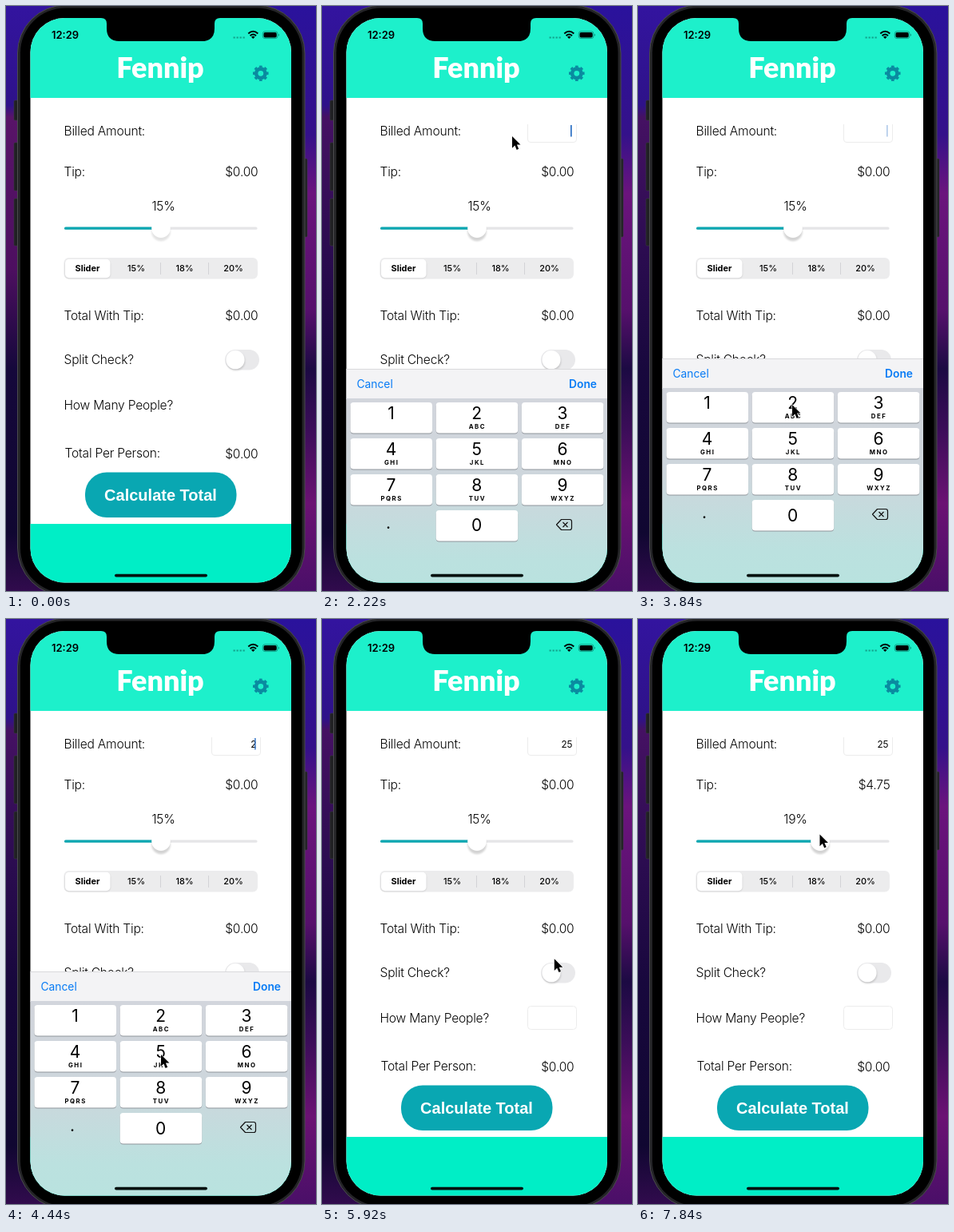
These frames come from a looping animation (388 by 732 pixels, 7.99 s). An HTML page:

```html
<!DOCTYPE html>
<html lang="en">
<head>
<meta charset="utf-8">
<title>Tip calculator</title>
<style>
html, body { margin: 0; width: 100%; height: 100%; overflow: hidden; background: #12092f; }
svg { display: block; width: 388px; height: 732px; font-family: Inter, "Open Sans", sans-serif; }
.label { font-size: 15.6px; font-weight: 300; letter-spacing: -.22px; fill: #050505; }
.end { text-anchor: end; }
.mid { text-anchor: middle; }
.segment { font-size: 10.9px; font-weight: 500; text-anchor: middle; }
.digit { font-size: 21px; text-anchor: middle; }
.letters { font-size: 7.8px; font-weight: 700; letter-spacing: 1.5px; text-anchor: middle; }
.bar { font-size: 13.8px; fill: #077bf5; }
</style>
</head>
<body>
<svg viewBox="0 0 388 732">
  <defs>
    <linearGradient id="left" x2="0" y2="1">
      <stop offset="0" stop-color="#33149f"/><stop offset=".17" stop-color="#2e1289"/>
      <stop offset=".19" stop-color="#581468"/><stop offset=".45" stop-color="#4d0f60"/>
      <stop offset=".62" stop-color="#15083b"/><stop offset=".9" stop-color="#100731"/>
      <stop offset="1" stop-color="#310b4d"/>
    </linearGradient>
    <linearGradient id="leftLater" x2="0" y2="1">
      <stop offset="0" stop-color="#33149f"/><stop offset=".17" stop-color="#2e1289"/>
      <stop offset=".19" stop-color="#451163"/><stop offset=".42" stop-color="#2b0c50"/>
      <stop offset=".62" stop-color="#18083d"/><stop offset=".9" stop-color="#100731"/>
      <stop offset="1" stop-color="#310b4d"/>
    </linearGradient>
    <linearGradient id="right" x2="0" y2="1">
      <stop offset="0" stop-color="#2a129c"/><stop offset=".22" stop-color="#34118a"/>
      <stop offset=".32" stop-color="#6b147d"/><stop offset=".52" stop-color="#56106c"/>
      <stop offset=".62" stop-color="#1c0a43"/><stop offset=".72" stop-color="#3a0d58"/>
      <stop offset=".85" stop-color="#6b1273"/><stop offset="1" stop-color="#4a0f68"/>
    </linearGradient>
    <linearGradient id="board" x2="0" y2="1">
      <stop offset="0" stop-color="#d2d5dc"/><stop offset=".42" stop-color="#cdd6dc"/>
      <stop offset=".78" stop-color="#bbe1df"/><stop offset="1" stop-color="#b8e3df"/>
    </linearGradient>
    <clipPath id="screen"><rect x="30.500" y="15" width="326.500" height="706.500" rx="43"/></clipPath>
    <filter id="soft" x="-50%" y="-50%" width="200%" height="200%"><feGaussianBlur stdDeviation="1.3"/></filter>
  </defs>

  <rect id="wall" width="194" height="732"/>
  <rect x="194" width="194" height="732" fill="url(#right)"/>
  <g fill="#202023" stroke="#3c3b40" stroke-width=".6">
    <rect x="10" y="118" width="6" height="25" rx="1.500"/>
    <rect x="10" y="171" width="6" height="60" rx="1.500"/>
    <rect x="10" y="241" width="6" height="59" rx="1.500"/>
    <rect x="372" y="191" width="5" height="98" rx="1.500"/>
  </g>
  <rect x="14.500" y="-1" width="359.500" height="739" rx="60" fill="#242427" stroke="#4b4b4e"/>
  <rect x="18" y="2.500" width="352.500" height="732" rx="56"/>

  <g clip-path="url(#screen)">
    <path d="M30 15H358V722H30Z" fill="#fff"/>
    <path d="M30 15H358V115H30Z" fill="#1df0cb"/>
    <path d="M30 648H358V722H30Z" fill="#00eec6"/>
    <text x="193" y="90" class="mid" style="font:900 36px Lato,sans-serif" fill="#fff">Fennip</text>
    <g transform="translate(318.800 84.300)" fill="none" stroke="#0a8ba0">
      <circle r="5.700" stroke-width="4.600"/>
      <circle r="8.400" stroke-width="2.800" pathLength="16" stroke-dasharray="1.100 .9" stroke-dashoffset=".55"/>
    </g>

    <g class="label">
      <text x="72.500" y="162">Billed Amount:</text>
      <text x="72.500" y="213">Tip:</text>
      <text x="72.500" y="393">Total With Tip:</text>
      <text x="72.500" y="448">Split Check?</text>
      <text x="72.500" y="505">How Many People?</text>
      <text x="73.500" y="564.500">Total Per Person:</text>
      <text id="percent" class="mid" x="197" y="255.500"></text>
      <text id="tip" class="end" x="315.500" y="212.500"></text>
      <text class="end" x="315.500" y="392.500">$0.00</text>
      <text class="end" x="315.500" y="566">$0.00</text>
    </g>

    <g id="fields" fill="none" stroke="#ececec">
      <path d="M257.500 148V167Q257.500 170.500 261 170.500H315Q318.500 170.500 318.500 167V148"/>
      <rect x="257.500" y="484.500" width="61" height="29" rx="4"/>
    </g>
    <text id="amount" class="end" x="313.500" y="160.500" font-size="11.700"></text>
    <rect id="caret" x="311" y="149" width="1.700" height="14.500" fill="#2c6fc4"/>

    <rect x="73" y="276.500" width="241.500" height="3.300" rx="1.600" fill="#e5e5e7"/>
    <rect id="filled" x="73" y="276.500" height="3.300" rx="1.600" fill="#0aa7b1"/>
    <g id="thumb">
      <circle id="thumbShadow" cy="282.500" r="11.800" filter="url(#soft)"/>
      <circle cy="278.200" r="11.800" fill="#fff"/>
    </g>

    <rect x="72.500" y="315" width="242.500" height="26.500" rx="6" fill="#ececed"/>
    <rect x="74" y="318" width="56.500" height="23" rx="5" fill="#000" opacity=".14" filter="url(#soft)"/>
    <rect x="74" y="316.800" width="56.500" height="23.400" rx="5" fill="#fff"/>
    <path d="M193.500 321V336M253.500 321V336" stroke="#d3d3d6"/>
    <g class="segment">
      <text x="102" y="332.400" font-weight="650">Slider</text>
      <text x="163" y="332.400">15%</text>
      <text x="223.500" y="332.400">18%</text>
      <text x="284.500" y="332.400">20%</text>
    </g>

    <rect x="274" y="430" width="43" height="25.500" rx="12.700" fill="#e9e9eb"/>
    <circle cx="287.500" cy="444.500" r="11.600" opacity=".16" filter="url(#soft)"/>
    <circle cx="287" cy="442.700" r="11.600" fill="#fff"/>

    <rect x="99" y="583.500" width="189.500" height="56.500" rx="27" fill="#09a7b2"/>
    <text x="193.500" y="618.500" class="mid" style="font:700 20px 'Liberation Sans',sans-serif" fill="#fff">Calculate Total</text>

    <g id="keyboard">
      <rect x="30" y="441" width="328" height="38" fill="#f3f3f5"/>
      <path d="M30 441.500H358" stroke="#d9d9dc"/>
      <rect x="30" y="478" width="328" height="260" fill="url(#board)"/>
      <text class="bar" x="43.500" y="465">Cancel</text>
      <text class="bar end" x="344" y="465" font-weight="600">Done</text>
      <g id="keys"></g>
      <text x="83" y="641" class="digit" font-size="20">.</text>
      <path d="M293.500 636L299.500 629.500H310Q312.500 629.500 312.500 632V640Q312.500 642.500 310 642.500H299.500ZM301.500 633L307.500 639M307.500 633L301.500 639"
        fill="none" stroke="#111" stroke-width="1.200" stroke-linejoin="round"/>
    </g>
  </g>

  <path d="M119 14V15Q126 15 126 22V28Q126 44 142 44H245Q261 44 261 28V22Q261 15 268 15V14Z"/>
  <text x="57" y="41" font-size="13" font-weight="600">12:29</text>
  <path d="M284.500 39.500H299" stroke="#12a48d" stroke-width="2" stroke-dasharray="2.300 1.700"/>
  <g fill="none" stroke="#000" stroke-width="2">
    <path d="M303.300 34.500Q309.300 29 315.300 34.500M305.600 37.200Q309.300 33.800 313 37.200"/>
  </g>
  <path d="M307 38.700Q309.300 36.800 311.600 38.700L309.300 41Z"/>
  <rect x="321.300" y="31.800" width="18.600" height="8.800" rx="2.700" fill="none" stroke="#0c8c78" stroke-width=".8"/>
  <rect x="322.500" y="33" width="16.200" height="6.400" rx="1.700"/>
  <path d="M341 34.700Q343 36.200 341 37.800Z" fill="#0c8c78"/>
  <rect x="136" y="710.700" width="116" height="3.800" rx="1.900" fill="#04110f"/>

  <path id="cursor" d="M0 0V14.800L3.400 11.600 5.700 16.900 8.200 15.800 5.900 10.600H10.500Z" stroke="#fff" stroke-width="1.100" paint-order="stroke"/>
</svg>
<script>
const LOOP = 7990, TICK = 148;
const $ = id => document.getElementById(id);

// Pointer path: [tick, x, y]
const pointer = [
  [3, 384, 372], [6, 350, 235], [9, 302, 135], [12, 273, 162], [13, 273, 162],
  [15, 238, 163], [18, 228, 300], [21, 217, 447], [22, 210, 493], [23, 210, 493],
  [26, 193, 499], [28, 193, 500], [30, 194, 545], [32, 194, 546], [35, 300, 480],
  [37, 320, 464], [39, 318, 463], [44, 182, 274], [46, 192, 273], [47, 193, 273],
  [53, 227.5, 269.5]
];
const TYPED = { 2: 27, 5: 31 };

const letters = ["", "ABC", "DEF", "GHI", "JKL", "MNO", "PQRS", "TUV", "WXYZ"];

function key(digit, col, row, sub = "") {
  const x = 35.5 + col * 107.2, y = 483 + row * 45, mid = x + 51;
  const base = y + (digit ? 21.3 : 26.5);
  return `<rect x="${x}" y="${y + 1}" width="102.5" height="38.5" rx="4" fill="#90959b"/>
    <rect id="key${digit}" x="${x}" y="${y}" width="102.5" height="38.5" rx="4"/>
    <text class="digit" x="${mid}" y="${base}">${digit}</text>
    <text class="letters" x="${mid + .7}" y="${y + 32.6}">${sub}</text>`;
}
$("keys").innerHTML = letters.map((sub, i) => key(i + 1, i % 3, Math.floor(i / 3), sub)).join("") + key(0, 1, 3);
for (let d = 0; d < 10; d++) $("key" + d).setAttribute("fill", "#fff");

const set = (id, name, value) => $(id).setAttribute(name, value);
const show = (id, on) => set(id, "visibility", on ? "visible" : "hidden");

function along(points, tick) {
  const next = points.findIndex(p => p[0] >= tick);
  if (next < 0) return points[points.length - 1].slice(1);
  if (next === 0) return points[0].slice(1);
  const a = points[next - 1], b = points[next];
  const k = (tick - a[0]) / (b[0] - a[0]);
  return [a[1] + (b[1] - a[1]) * k, a[2] + (b[2] - a[2]) * k];
}

function keyboardOffset(ms) {
  if (ms < 2010) return 300;
  if (ms < 5720) return 280 * Math.exp(-(ms - 2005) / 70);
  return 300 * (1 - Math.exp(-(ms - 5720) / 70));
}

function draw(time) {
  const tick = Math.floor((time + 16) / TICK), ms = tick * TICK;
  const [x, y] = along(pointer, tick);
  show("cursor", tick >= 3);
  set("cursor", "transform", `translate(${x} ${y})`);
  set("wall", "fill", tick < 11 ? "url(#left)" : "url(#leftLater)");

  const offset = keyboardOffset(ms);
  show("keyboard", offset < 295);
  set("keyboard", "transform", `translate(0 ${offset})`);
  for (const d in TYPED) set("key" + d, "fill", tick === TYPED[d] ? "#c3c7ce" : "#fff");

  const active = tick >= 14;
  show("fields", active);
  $("amount").textContent = Object.keys(TYPED).filter(d => tick >= TYPED[d]).join("");
  show("caret", active && tick < 39);
  set("caret", "opacity", .6 + .4 * Math.cos((ms - 2220) / 1200 * 2 * Math.PI));

  const drag = Math.min(1, Math.max(0, (tick - 47) / 6)), thumb = 194 + 34 * drag;
  const percent = Math.floor(15 + (thumb - 194) / 7.25);
  set("thumb", "transform", `translate(${thumb} 0)`);
  set("thumbShadow", "opacity", active ? .17 : .11);
  set("filled", "width", thumb - 73);
  $("percent").textContent = percent + "%";
  $("tip").textContent = "$" + (drag ? 25 * percent / 100 : 0).toFixed(2);
}

let start;
function loop(now) {
  start ??= now;
  draw((now - start) % LOOP);
  requestAnimationFrame(loop);
}
draw(0);
requestAnimationFrame(loop);
</script>
</body>
</html>
```
